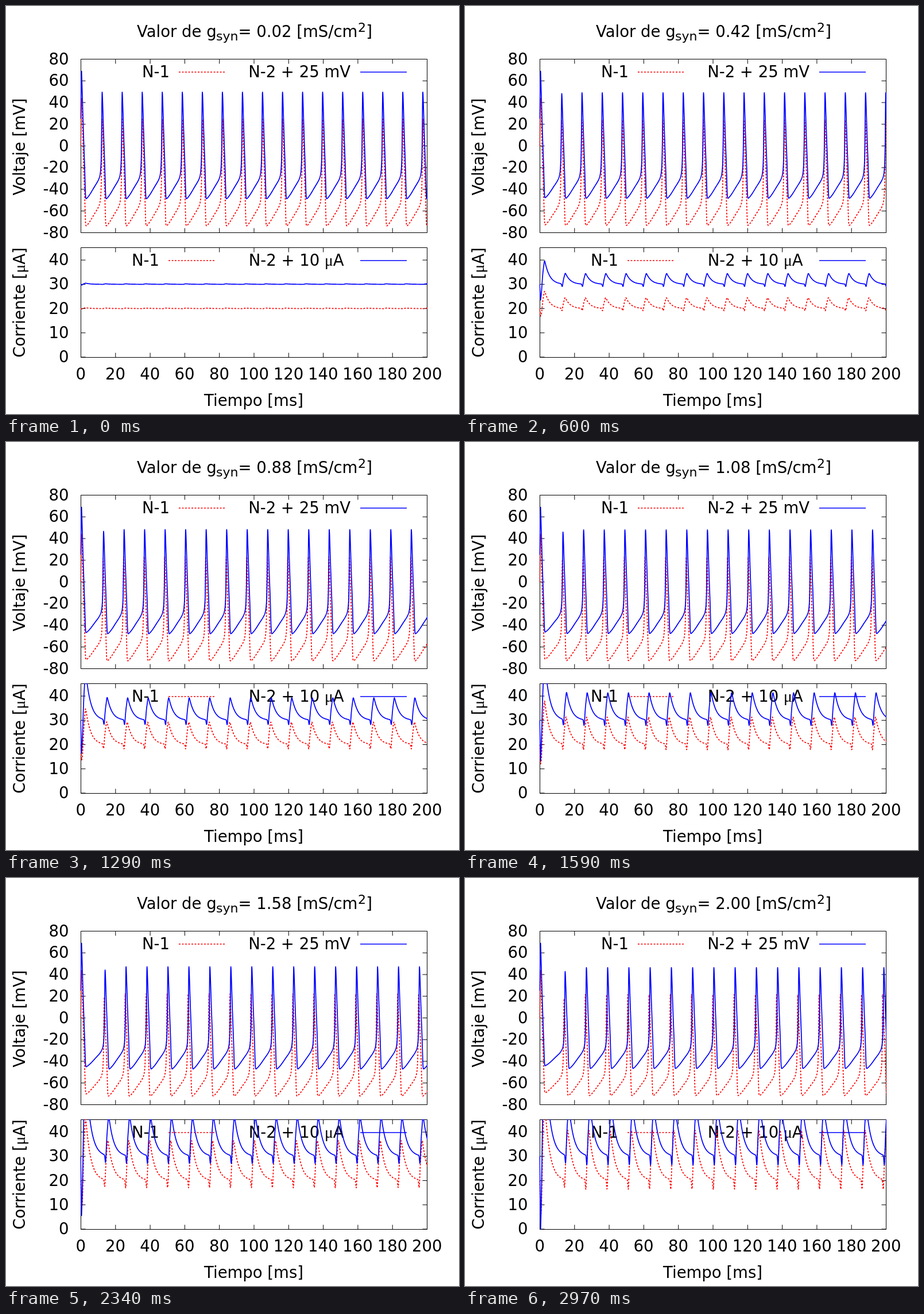
An HTML page for the animation above (3 s loop, 789 by 710 pixels).

```html
<!DOCTYPE html>
<html lang="es">
<head>
<meta charset="utf-8">
<style>
  html, body { margin: 0; width: 100%; height: 100%; overflow: hidden; background: #fff; }
  svg { display: block; }
  text { font: 27.5px "DejaVu Sans", sans-serif; white-space: pre; }
  .small { font-size: 22px; }
  .mu { font-family: "Liberation Serif", serif; }
  .mid { text-anchor: middle; }
  .end { text-anchor: end; }
  path { fill: none; stroke-width: 1.7; stroke-linejoin: round; }
  .frame { stroke: #000; stroke-width: 1; }
  .n1 { stroke: #f00; stroke-dasharray: 3 2.5; }
  .n2 { stroke: #00f; }
</style>
</head>
<body>
<svg width="789" height="710" viewBox="0 0 789 710">
  <clipPath id="top"><rect x="129.5" y="92" width="604.5" height="303"/></clipPath>
  <clipPath id="low"><rect x="129.5" y="420" width="604.5" height="191.5"/></clipPath>

  <text x="228" y="54">Valor de g</text>
  <text x="366" y="60" class="small">syn</text>
  <text x="404.5" y="54" id="value"></text>
  <text x="613" y="45" class="small">2</text>
  <text x="627.3" y="54">]</text>
  <text x="431.5" y="696" class="mid">Tiempo [ms]</text>
  <text class="mid" transform="translate(33 245) rotate(-90)">Voltaje [mV]</text>
  <text class="mid" transform="translate(33 516) rotate(-90)">Corriente [<tspan class="mu">μ</tspan>A]</text>

  <text x="285" y="123.5" class="end">N-1</text>
  <text x="600" y="123.5" class="end">N-2 + 25 mV</text>
  <text x="267" y="451.5" class="end">N-1</text>
  <text x="588.5" y="451.5" class="end">N-2 + 10 <tspan class="mu">μ</tspan>A</text>
  <g id="axes"></g>

  <path class="n1" d="M301 115H381"/>
  <path class="n2" d="M617 115H698"/>
  <path class="n1" d="M283 443H363"/>
  <path class="n2" d="M617 443H698"/>
  <g clip-path="url(#top)"><path id="v1" class="n1"/><path id="v2" class="n2"/></g>
  <g clip-path="url(#low)"><path id="i1" class="n1"/><path id="i2" class="n2"/></g>
</svg>
<script>
const $ = id => document.getElementById(id);
const LEFT = 130, WIDTH = 604, PX_PER_MS = 3.018, DECAY = 9.1;
const voltY = v => 243.5 - 1.8875 * v;
const ampY = i => 611 - 4.222 * i;
const sigmoid = x => 1 / (1 + Math.exp(-x));

function drawAxes() {
  let ticks = 'M130.5 92.5H733.5V394.5H130.5ZM130.5 420.5H733.5V611.5H130.5Z';
  let labels = '';
  const yTick = (y, n) => {
    ticks += `M130.5 ${y}h8M733.5 ${y}h-8`;
    labels += `<text class="end" x="109.5" y="${y + 9}">${n}</text>`;
  };
  for (let v = -80; v <= 80; v += 20) yTick(voltY(v), v);
  for (let i = 0; i <= 40; i += 10) yTick(ampY(i), i);
  for (let t = 0; t <= 200; t += 20) {
    const x = 130.5 + t * 3.015;
    for (const [y, d] of [[92.5, 8], [394.5, -8], [420.5, 8], [611.5, -8]]) ticks += `M${x} ${y}v${d}`;
    labels += `<text class="mid" x="${x - 0.3}" y="650">${t}</text>`;
  }
  $('axes').innerHTML = `<path class="frame" d="${ticks}"/>${labels}`;
}

// One peak-to-peak cycle of a Hodgkin-Huxley neuron driven by 20 µA, as [px, mV]
function firingCycle() {
  const dt = .005, pts = [];
  let v = -65, m = .05, h = .6, n = .32, before = v, peaks = 0, since = 0;
  for (let t = 0; t < 200; t += dt) {
    const am = .1 * (v + 40) / (1 - Math.exp(-(v + 40) / 10)), bm = 4 * Math.exp(-(v + 65) / 18);
    const ah = .07 * Math.exp(-(v + 65) / 20), bh = sigmoid((v + 35) / 10);
    const an = .01 * (v + 55) / (1 - Math.exp(-(v + 55) / 10)), bn = .125 * Math.exp(-(v + 65) / 80);
    const next = v + dt * (20 - 120 * m ** 3 * h * (v - 50) - 36 * n ** 4 * (v + 77) - .3 * (v + 54.4));
    m += dt * (am * (1 - m) - bm * m);
    h += dt * (ah * (1 - h) - bh * h);
    n += dt * (an * (1 - n) - bn * n);
    if (v > 0 && v > before && v >= next) {
      peaks++;
      if (peaks === 6) return { pts, length: since * dt * PX_PER_MS };
      since = 0;
    }
    if (peaks === 5 && since % 20 === 0) pts.push([since * dt * PX_PER_MS, v]);
    since++;
    before = v;
    v = next;
  }
}
const cycle = firingCycle();
const KNEE = -50;
const cycleTop = cycle.pts[0][1];
const cycleDip = Math.min(...cycle.pts.map(p => p[1]));

// Fit a cycle's height, above and below the firing knee
const fit = (v, peak, dip) => KNEE + (v - KNEE) *
  (v > KNEE ? (peak - KNEE) / (cycleTop - KNEE) : (dip - KNEE) / (cycleDip - KNEE));

function spikeTimes(g, lead) {
  const first = 37.45 + 2.4 * g + .55 * g * g - lead;
  const period = 34.89 + .88 * g + .09 * g * g;
  return Array.from({ length: 18 }, (_, k) => first + k * period);
}

function voltage(g, spikes) {
  const pts = [[0, 0], [.4, 11], [1, 30], [1.6, 43.8], [2.2, 35]];
  const peaks = [24.7, 24.7 - 3.45 * g];
  // Only the slow recovery between spikes is stretched
  const addCycle = (from, to, peak, nextPeak, dip, skip) => {
    for (const [x, v] of cycle.pts) {
      if (x < skip) continue;
      const slow = Math.min(1, Math.max(0, (x - 8) / (cycle.length - 18)));
      const top = x < cycle.length / 2 ? peak : nextPeak;
      pts.push([from + x + (to - from - cycle.length) * slow, fit(v, top, dip)]);
    }
  };
  addCycle(2.4, spikes[0], peaks[0], peaks[1], -73.7 + 2.3 * g, 1);
  for (let k = 1; k < spikes.length; k++) {
    const later = 24.7 - 1.6 * g;
    addCycle(spikes[k - 1], spikes[k], k > 1 ? later : peaks[1], later, -73.7 + 1.05 * g, 0);
  }
  return pts;
}

// Synaptic current from a gate that opens at each spike and decays
function current(g, spikes, volts, gate0) {
  const pts = [];
  let k = 0;
  for (let x = 0; x <= WIDTH; x += .4) {
    while (volts[k + 1][0] < x) k++;
    const [x0, v0] = volts[k], [x1, v1] = volts[k + 1];
    const v = v0 + (v1 - v0) * (x - x0) / (x1 - x0);
    let s = Math.exp(-x / DECAY) * (gate0 + .46 * sigmoid((x - 3) / .6));
    for (const at of spikes) {
      const d = x - at;
      if (d > -6) s += .29 * Math.exp(-d / DECAY) * sigmoid((d - .8) / .45);
    }
    pts.push([x, 20 - g * s * v]);
  }
  return pts;
}

function plot(id, pts, toY, shift) {
  $(id).setAttribute('d', 'M' + pts.map(([x, v]) =>
    (LEFT + x).toFixed(2) + ' ' + toY(v + shift).toFixed(2)).join('L'));
}

function neuron(n, g, lead, gate0, voltShift, ampShift) {
  const spikes = spikeTimes(g, lead);
  const volts = voltage(g, spikes);
  plot('v' + n, volts, voltY, voltShift);
  plot('i' + n, current(g, spikes, volts, gate0), ampY, ampShift);
}

let shown = -1;
const begin = performance.now();
function draw() {
  const step = Math.floor((performance.now() - begin) % 3000 / 30);
  if (step !== shown) {
    shown = step;
    const g = (step + 1) * .02;
    $('value').textContent = `= ${g.toFixed(2)} [mS/cm`;
    neuron(1, g, .9 * g, .16, 0, 0);
    neuron(2, g, 0, .38, 25, 10);
  }
  requestAnimationFrame(draw);
}
drawAxes();
draw();
</script>
</body>
</html>
```
